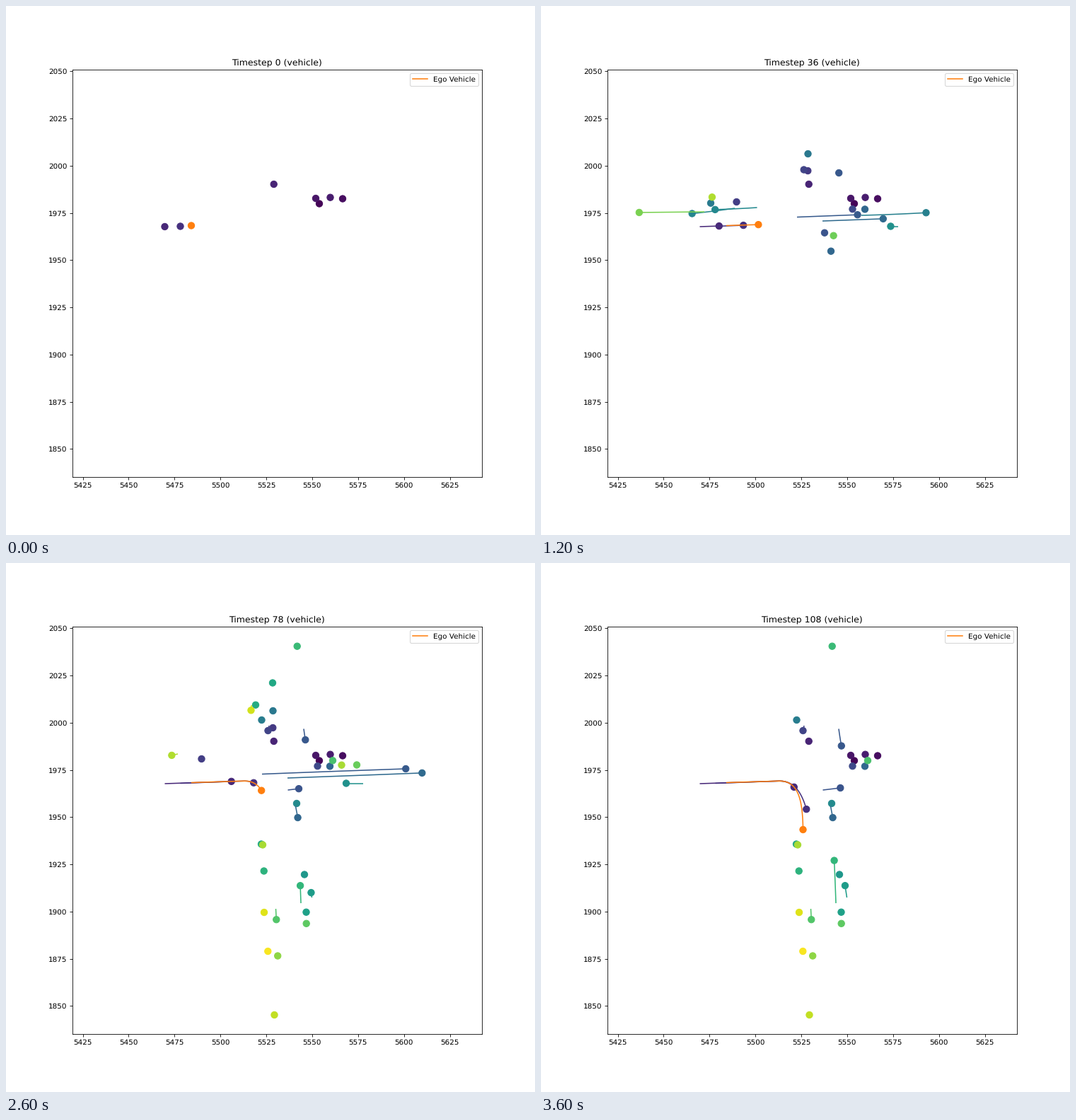
Recreate the animation shown at these times as a matplotlib script. Size 748x748 px, loop 3.7 s.

```python
import numpy as np
import matplotlib.pyplot as plt
from matplotlib.animation import FuncAnimation
from matplotlib.collections import LineCollection

SIZE = 748
FRAMES, STEP = 37, 3
LAST = (FRAMES - 1) * STEP
EGO_COLOR, EGO = "tab:orange", 2

plt.rcParams.update({"font.family": "DejaVu Sans", "text.hinting": "none"})
fig, ax = plt.subplots(figsize=(10, 10), dpi=SIZE / 10)
ax.set(xlim=(5419.2, 5642.6), ylim=(1835.3, 2051.0),
       xticks=range(5425, 5626, 25), yticks=range(1850, 2051, 25))
to_data = ax.transData.inverted()
title = ax.set_title("")
steps = np.arange(LAST + 1)
cars = []


def add(shade, start, end, x, y):
    """Store a vehicle whose stage position x, y is given for every step."""
    xy = np.column_stack(np.broadcast_arrays(x, SIZE - y, steps))[:, :2]
    color = EGO_COLOR if shade == EGO else plt.cm.viridis(shade)
    cars.append((shade, start, end, to_data.transform(xy), color))


def parked(spots, lo, hi, start, end=LAST, gap=0):
    """Standing vehicles, shaded evenly from lo to hi, arriving gap steps apart."""
    for i, (shade, (x, y)) in enumerate(zip(np.linspace(lo, hi, len(spots)), spots)):
        add(shade, start + gap * i, end, x, y)


def drive(shade, start, pos, vel, acc=(0, 0), end=LAST, stop=LAST):
    """Steadily accelerated motion that halts after stop steps."""
    t = np.clip(steps - start, 0, stop)
    x, y = (p + v * t + a * t**2 for p, v, a in zip(pos, vel, acc))
    add(shade, start, end, x, y)


def turn_right(shade, pos, lag, drift=0):
    """Pull away, follow the lane to the junction, then take a Bezier turn."""
    corner = np.array([(335, 308.3), (362, 307), (370 + drift / 3, 330), (370.5 + drift, 377)])
    s = 1.63 * steps - lag * (1 - np.exp(-steps / 12))
    lane = corner[0, 0] - pos[0]
    f = np.clip(s / lane, 0, 1)[:, None]
    u = np.clip((s - lane) / 88, 0, 1)[:, None]
    bend = np.hstack([(1 - u)**3, 3 * u * (1 - u)**2, 3 * u**2 * (1 - u), u**3]) @ corner
    x, y = (pos + f * (corner[0] - pos) + bend - corner[0]).T
    add(shade, 0, LAST, x, y)


# ego vehicle and its followers
turn_right(EGO, np.array([262, 310.5]), lag=14)
turn_right(.14, np.array([246.5, 311.5]), lag=20, drift=11)
turn_right(.11, np.array([224.5, 312]), lag=33)

# traffic on the main road
drive(.80, 4, (231, 291), (-2.88, .03), end=42)
drive(.46, 3, (274, 286), (-2.05, .29), (.0067, -.0019), end=67)
drive(.47, 3, (305.5, 285), (-1.65, .11), (-.0045, -.0007), end=70)
drive(.28, 3, (362, 298.5), (2.5, -.1), (.0028, 0), end=78)
drive(.34, 3, (398, 304), (2.65, -.095), (-.0015, 0), end=78)
drive(.43, 3, (453, 296), (2.6, -.06), (.0052, -.0016), end=69)
drive(.50, 3, (505, 311.5), (-.32, 0), end=78)
drive(.97, 61, (601, 276), (-1.2, .2), end=75, stop=5)

# slow traffic on the side roads
drive(.20, 32, (372, 230), (-.08, .37), stop=19)
drive(.26, 28, (398.5, 321), (.31, -.037))
drive(.27, 32, (421, 234.5), (.05, .37), (0, -.0007))
drive(.33, 33, (409.5, 344), (.17, .89), stop=18)
drive(.55, 57, (432.5, 473), (-.05, -.33))
drive(.66, 60, (417, 481), (-.05, -1.45), (0, .004))
drive(.73, 57, (381.5, 489), (.04, .8), stop=19)
drive(.78, 30, (412, 324), (.27, .12), end=75)
drive(.88, 30, (243, 270), (-.18, .04), end=78)
drive(.93, 61, (346.5, 201), (0, .43), end=102)

# standing vehicles
parked([(443, 279.5), (476, 272.5), (438, 272), (458.5, 270.7), (378.7, 252)], .01, .10, 0)
parked([(377.3, 233), (276.5, 277)], .17, .18, 3, end=97)
parked([(240, 278.7)], .41, .41, 3, end=75)
parked([(440.5, 287.2), (458, 287.4)], .22, .33, 24)
parked([(377.5, 209)], .40, .40, 24, end=99)
parked([(361.5, 222), (411, 340), (422, 440.5)], .42, .53, 45)
parked([(377, 169.5), (353, 200.7)], .60, .61, 45, end=96)
parked([(496, 285.5), (474.5, 285.7)], .77, .87, 48, end=97, gap=12)
parked([(424.5, 493.7), (361, 397.5), (364.7, 435.5), (411.7, 117.7),
        (462, 279.3), (424.7, 509.8)], .57, .75, 57)
parked([(384.2, 555.5), (363, 398.5), (379.5, 639), (365, 494), (370.3, 549)],
       .83, .99, 68, gap=2)

cars.sort(key=lambda car: car[0])
dots = ax.scatter([], [], s=80, zorder=1)
trails = ax.add_collection(LineCollection([], linewidths=1.5, zorder=2), autolim=False)
ax.legend([plt.Line2D([], [], color=EGO_COLOR)], ["Ego Vehicle"], loc="upper right")


def update(frame):
    now = frame * STEP
    title.set_text(f"Timestep {now} (vehicle)")
    live = [(path[start:now + 1], color)
            for _, start, end, path, color in cars if start <= now <= end]
    paths, colors = zip(*live)
    trails.set_segments(paths)
    trails.set_color(colors)
    dots.set_offsets([path[-1] for path in paths])
    dots.set_color(colors)


anim = FuncAnimation(fig, update, frames=FRAMES, interval=100, repeat=True)
plt.show()
```
